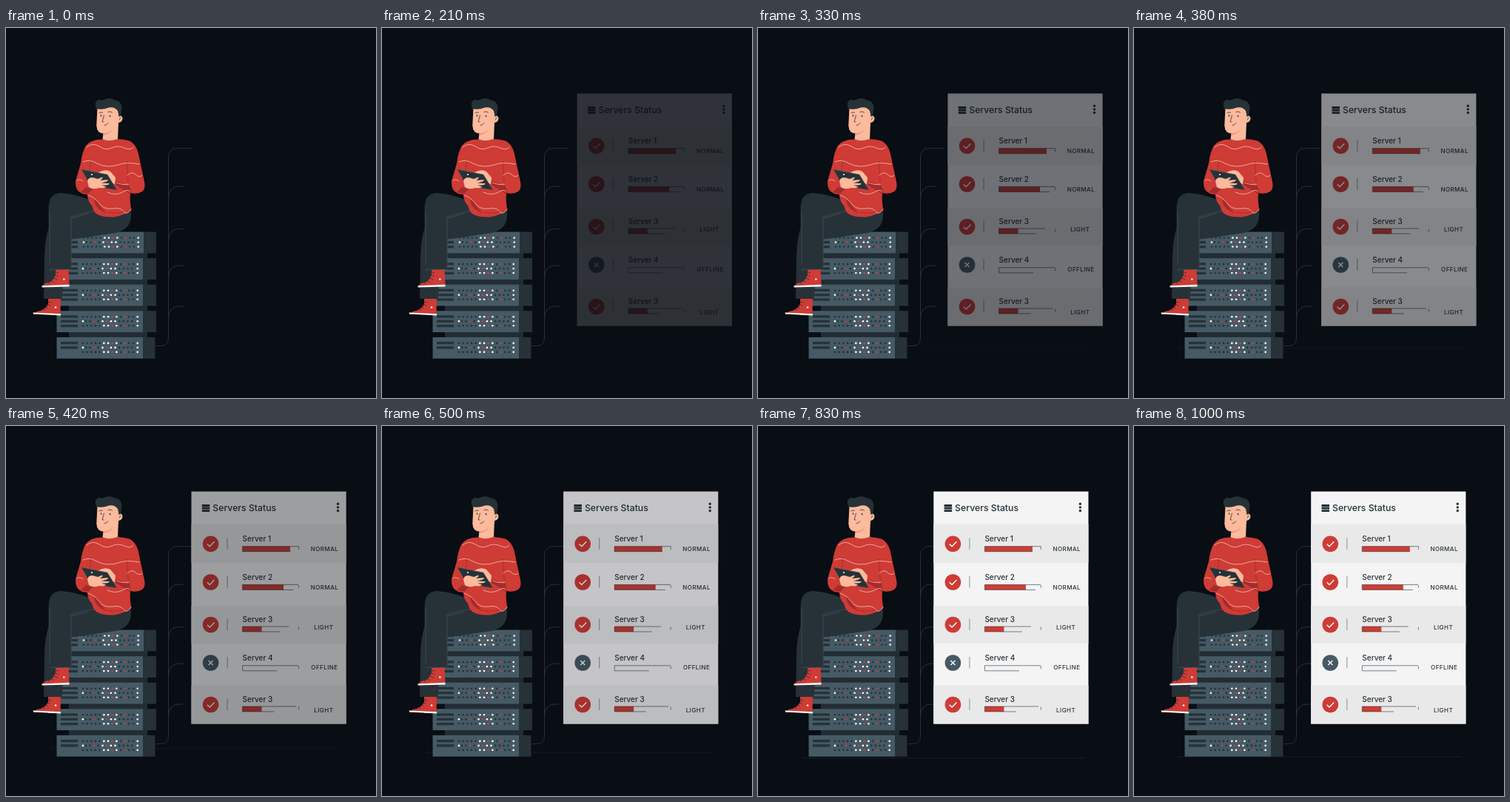
An HTML page for the animation above (1.04 s loop, 500 px wide and 500 px high).

```html
<!DOCTYPE html>
<html lang="en">
<head>
<meta charset="utf-8">
<title>Servers Status</title>
<style>
  html, body { margin: 0; width: 100%; height: 100%; overflow: hidden; background: #090d14; }
  svg { display: block; width: 100%; height: 100%; }
  text { font-family: Inter, "Open Sans", sans-serif; font-weight: 500; fill: #263238; }
  .title { font-size: 12.25px; }
  .name { font-size: 10px; }
  .state { font-size: 8px; letter-spacing: .45px; text-anchor: middle; }
  .dark { fill: #263238; }
  .red { fill: #cf3b35; }
  .skin { fill: #fdba9c; }
  .shade { fill: #a52b29; }
  .white { fill: #f7f7f7; }
  .line { fill: none; stroke: #263238; stroke-width: .8; stroke-linecap: round; stroke-linejoin: round; }
  .seam { fill: none; stroke: #4b5a62; stroke-width: .6; }
  .knit { fill: none; stroke: #f3c9c4; stroke-width: .75; stroke-linecap: round; }
  .crease { fill: none; stroke: #8f2826; stroke-width: .6; }
  .wire { fill: none; stroke: #2d353c; stroke-width: .9; }
  .mark { fill: none; stroke: #fff; stroke-width: 1.4; }
</style>
</head>
<body>
<svg viewBox="0 0 500 500">
  <path id="floor" d="M59 447.500H443" stroke="#1d252b" stroke-width=".8" opacity="0"/>
  <g id="wires" class="wire">
    <path d="M202 429.500H209Q219.500 429.500 219.500 419V175Q219.500 162.500 232 162.500H252"/>
  </g>
  <g id="rack"></g>

  <g id="legs">
    <path class="dark" d="M60 264Q53 280 52 306L51 366H75.500L79 322Z"/>
    <path class="red" d="M57 366H74L73.500 387H37Q39 383 47 382Q54 379 57 373Z"/>
    <path class="white" d="M36.500 384.500L74 386.200V388.600L37 386.600Z"/>
    <circle class="white" cx="67" cy="377.500" r="1.300"/>
    <path class="line" d="M57 370l4 1M55.500 373.500l4 1.500M53 377l3.500 2M49 379.500l3 2"/>
    <path class="red" d="M67 325H84.500L85.500 348.500H49Q52 344.500 59 343.500Q65 340 67 333Z"/>
    <path class="white" d="M48.500 348.200L85.500 346.800V349.400L48.500 350.600Z"/>
    <circle class="white" cx="78.300" cy="339.500" r="1.300"/>
    <path class="line" d="M67 330l4 1M66.500 334l4 1.500M65 338l4 2M61 341.500l3.500 2M56.500 343.500l3 2"/>
    <path class="dark" d="M58 327L57.500 243Q58 223 75 223Q92 224 110 231L168 243Q171 259 165 267Q159 276 141 278Q115 282 88.500 285.500V326Z"/>
    <path class="seam" d="M58.500 326.500H88M88 325V255Q103 250 119 247.500M88 257Q100 255 112 250M59 246V320"/>
  </g>

  <g id="person">
    <path class="red" d="M128 150.500Q114 151 108 159Q103 167 101 183L94 207Q93 220 103 224L110 225Q110 234 116 240Q118 248 122 251Q130 256 146 255.500Q160 253 169.500 246Q167 235 168 223Q178 225 184 221Q189 217 187 208L179 170Q176 157 167 152.500Q158 150 151 150Q139 153 128 150.500Z"/>
    <path class="shade" d="M119 231Q121 246 135 249Q127 242 124 234ZM111 224L101 222L108 215L118 217ZM148 212L168 224L167 214L150 207Z"/>
    <path class="crease" d="M115 178L113 194M163.500 180L165 207L168 223M131 248Q147 252 160 248"/>
    <path class="knit" d="M109 161Q117 154 126 160T143 162T160 162T172 161M104 181Q113 177 121 182T138 187T155 184T180 184M96 206Q100 203 104 207M164 199Q170 193 175 198T184 199M111 226Q119 228 126 237T144 244T159 248T169 245M137 222Q148 227 157 222T167 221M150 209Q158 213 166 211"/>
    <path class="skin" d="M125 195Q135 190 141 194L148 202L147 211L136 207Z"/>
    <path d="M102 191L137 198L150 219L114 213Z" fill="#263238" stroke="#59666d" stroke-width=".5"/>
    <circle class="white" cx="116" cy="198" r="1.100"/>
    <path class="skin" d="M110 207Q111 202 117 202L124 204L130 201.500Q132 203 127 206L138 205Q139 207 129 209.500L140 210Q139 213 129 212.500L135 214.500Q134 217 126 216Q117 219 112 215Z"/>
    <path class="skin" d="M123.500 107L122.300 132Q123 142.500 131.500 142.500L130.500 150.500Q140 154 151 150L152 128Q157.500 127 157.500 121.500Q156 117 152.500 119.500V106Z"/>
    <path d="M131.500 142.500Q140 142 144 136Q141 144 131.400 144.700Z" fill="#ee957d"/>
    <path class="dark" d="M122 109Q118 99 125.500 97Q130 98 133 96.500Q141 93 147 97.500Q156 98 156.500 108L155 118L152.500 120Q152 116 151 112Q147 106 139 107.500Q130 111 122 109Z"/>
    <path class="line" d="M126 115Q128 112.500 130.500 114.500M138 113.500Q141 112 143.500 114M132.500 118L130 126.500L132 127M133 131.500Q136 132 138 128.500M154.500 121L153.500 124"/>
    <circle class="dark" cx="128.500" cy="118.500" r="1"/>
    <circle class="dark" cx="140.500" cy="119" r="1"/>
  </g>

  <g id="panel" opacity="0">
    <path fill="#f4f4f4" d="M238.700 88.500h209.200v314H238.700Z"/>
    <path fill="#e9e9e9" d="M238.700 132.700h209.200v52.300H238.700ZM238.700 243h209.200v51H238.700ZM238.700 350.500h209.200v52H238.700Z"/>
    <path class="dark" d="M253 106h10.500v2.900H253ZM253 109.600h10.500v2.900H253ZM253 113.200h10.500v2.900H253Z"/>
    <text class="title" x="267.500" y="115.300">Servers Status</text>
    <g class="dark">
      <circle cx="436.800" cy="105.300" r="1.700"/>
      <circle cx="436.800" cy="109.900" r="1.700"/>
      <circle cx="436.800" cy="114.500" r="1.700"/>
    </g>
  </g>
</svg>
<script>
const NS = 'http://www.w3.org/2000/svg';
const byId = id => document.getElementById(id);

function add(parent, tag, attrs, label) {
  const el = document.createElementNS(NS, tag);
  for (const key in attrs) el.setAttribute(key, attrs[key]);
  if (label) el.textContent = label;
  parent.appendChild(el);
}

const box = (parent, x, y, width, height, fill) =>
  add(parent, 'rect', { x, y, width, height, fill });

// Cable branches
for (const y of [214, 271.5, 321, 376])
  add(byId('wires'), 'path', { d: `M219.500 ${y + 16}Q220 ${y} 234 ${y}H240` });

// Server rack
const rack = byId('rack');
const lamps = ['dddddwwrwdrddw', 'wddrdwrwwddddw', 'dddddwwrwdrddw'];
const lampColor = { d: '#263238', w: '#fff', r: '#cf3b35' };
for (let i = 0; i < 5; i++) {
  const y = 275.5 + i * 35.6;
  const edge = i ? 185 : 186;
  const left = i ? 68.5 : 80;
  if (i < 4) box(rack, 85, y + 28, 106, 8, '#222d33');
  box(rack, left, y, edge - left, 28.8, '#455a64');
  box(rack, edge, y, (i < 4 ? 203 : 201.5) - edge, 28.8, '#263238');
  for (let j = 0; j < (i === 4 ? 2 : 3); j++)
    box(rack, 74, y + 6 + j * 6.3, 23, 3.4, '#263238');
  lamps.forEach((row, r) => [...row].forEach((c, n) => add(rack, 'circle', {
    cx: (i ? 104 : 105) + n * 5.67 - (r === 1 && n > 0 && n < 13 ? 1.8 : 0),
    cy: y + 8 + r * 6,
    r: 1.3,
    fill: lampColor[c]
  })));
}

// Status rows: top and bottom are where the lines of the bar outline end
const rows = [
  { y: 159.3, name: 'Server 1', text: 156.3, fill: 64.5, top: 384, bottom: 372, state: 'NORMAL', base: 169.3 },
  { y: 211, name: 'Server 2', text: 208, fill: 55.5, top: 383, bottom: 376, state: 'NORMAL', base: 221.4 },
  { y: 268.5, name: 'Server 3', text: 264.6, fill: 26, top: 370, bottom: 358, state: 'LIGHT', base: 275.2 },
  { y: 320, name: 'Server 4', text: 317.4, fill: 0, top: 383, bottom: 354, state: 'OFFLINE', base: 329 },
  { y: 376.5, name: 'Server 3', text: 372.6, fill: 26, top: 380, bottom: 350, state: 'LIGHT', base: 387 }
];
const panel = byId('panel');
for (const row of rows) {
  const { y } = row;
  const off = row.state === 'OFFLINE';
  const barY = row.text + 6.4;
  add(panel, 'circle', { cx: 264.8, cy: y, r: 10.8, fill: off ? '#455a64' : '#cf3b35' });
  add(panel, 'path', {
    class: 'mark',
    d: off ? `M261.800 ${y - 3}l6 6m0 -6l-6 6` : `M260.100 ${y + .2}l3.400 3.300l6.300 -6.500`
  });
  add(panel, 'path', { d: `M287.300 ${y - 8}v15.500`, stroke: '#737a7e', 'stroke-width': .8 });
  add(panel, 'text', { class: 'name', x: 307.8, y: row.text }, row.name);
  box(panel, 307.8, barY, row.fill, 7, '#cf3b35');
  add(panel, 'path', {
    class: 'line',
    style: 'stroke-width:.6',
    d: `M${row.top} ${barY}H307.800v7H${row.bottom}M383.800 ${barY + 1}v3`
  });
  add(panel, 'text', { class: 'state', x: row.state === 'LIGHT' ? 417.5 : 418.7, y: row.base }, row.state);
}

// Pose keys: step, slide distance, opacity
const keys = [
  [3, 27.3, .04], [5, 25, .16], [7, 21, .32], [9, 14.5, .54], [12, 6.4, .8], [14, 2.7, .93],
  [16, 0, 1], [18, -1.1, 1], [20, -1.4, 1], [22, -.6, 1], [24, .5, 1]
];
const LOOP = 1040;
const FPS = 24;

// Steps start on whole hundredths of a second
function stepAt(ms) {
  let step = 0;
  while (Math.round((step + 1) * 100 / FPS) * 10 <= ms) step++;
  return Math.min(step, 24);
}

function poseAt(step) {
  if (step < 3) return [27.3, 0];
  const i = Math.max(1, keys.findIndex(k => k[0] >= step));
  const [a, b] = [keys[i - 1], keys[i]];
  const p = (step - a[0]) / (b[0] - a[0]);
  return [1, 2].map(n => a[n] + (b[n] - a[n]) * p);
}

function draw() {
  const [slide, alpha] = poseAt(stepAt(performance.now() % LOOP));
  panel.setAttribute('transform', `translate(${slide} 0)`);
  panel.setAttribute('opacity', alpha);
  byId('floor').setAttribute('transform', `translate(0 ${-slide})`);
  byId('floor').setAttribute('opacity', alpha);
  requestAnimationFrame(draw);
}
draw();
</script>
</body>
</html>
```
